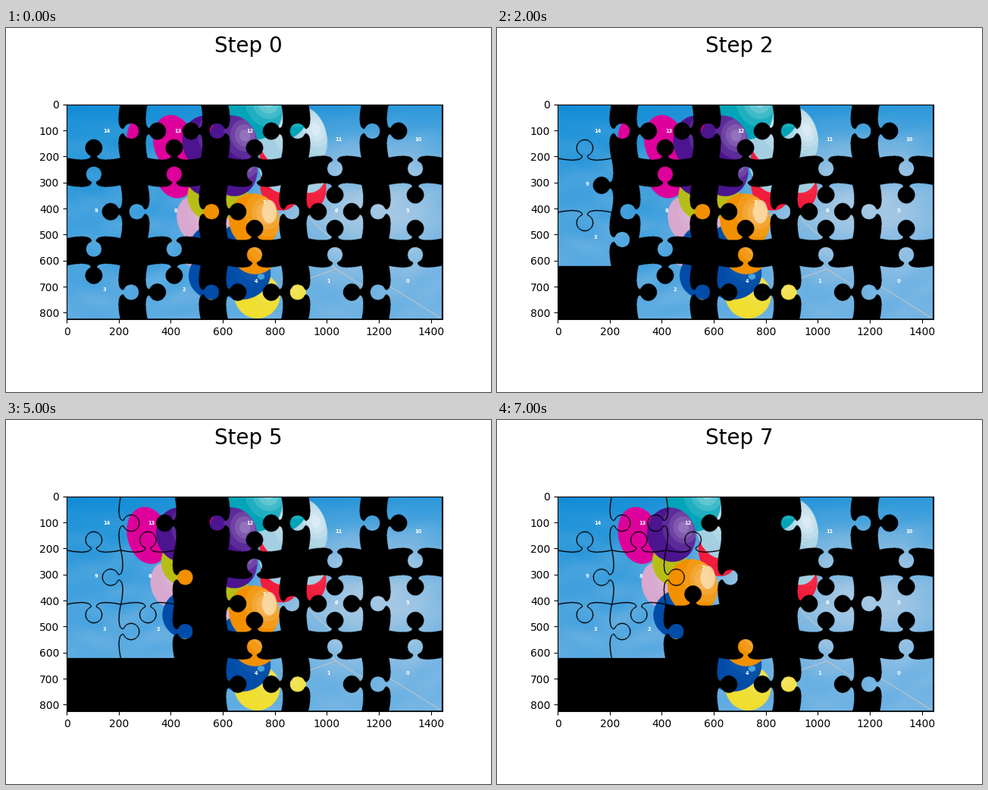
A matplotlib script for the animation above (8 s loop, 640x480 px).

```python
import numpy as np
import matplotlib.pyplot as plt
from matplotlib.animation import FuncAnimation
from matplotlib.colors import to_rgb
from matplotlib.path import Path

COLS, ROWS = 5, 3
CELL, PITCH = 208, 309         # joined and scattered spacing
PW, PH = COLS * CELL, ROWS * CELL
W, H = 1445, 826               # board size
SCALE = 496 / W                # stage pixels per board unit
LEFT, TOP = 80, 101            # board corner on the stage

# which way the knob of each inner edge points
KNOB_X = ["RLLR", "LRRL", "RRLL"]
KNOB_Y = ["UUUDD", "DDUUU"]
SIGN = {"R": 1, "D": 1, "L": -1, "U": -1}
NAMES = [*range(14, 4, -1), 3, 2, 4, 1, 0]

# centre, radii (stage pixels), gloss, colour; from back to front
BALLOONS = [
    (291, 144, 28, 40, .6, "#a4cfe2"),
    (187, 153, 27, 38, .0, "#de009b"),
    (213, 218, 22, 30, .2, "#d8a8cf"),
    (259, 108, 36, 40, .5, "#00a4b8"),
    (262, 284, 30, 30, .2, "#f0de30"),
    (228, 190, 23, 28, .0, "#b6be16"),
    (230, 152, 32, 36, .4, "#4c148e"),
    (243, 256, 37, 33, .1, "#004ca8"),
    (258, 220, 33, 36, .4, "#f29000"),
]
RED = (292, 175, 26, 32, .1, "#f21c3c")
TILT = np.radians(-14)


# ---------- photo, in stage pixels ----------
X, Y = np.meshgrid(LEFT + np.arange(PW) * SCALE, TOP + np.arange(PH) * SCALE)


def blend(img, color, alpha):
    alpha = np.asarray(alpha, float)[..., None]
    img[:] = img * (1 - alpha) + np.array(to_rgb(color)) * alpha


def glow(cx, cy, rx, ry):
    return np.exp(-((X - cx) / rx) ** 2 - ((Y - cy) / ry) ** 2)


def balloon(img, cx, cy, rx, ry, gloss, color):
    dx, dy = X - cx, Y - cy
    u = (dx * np.cos(TILT) + dy * np.sin(TILT)) / rx
    v = (dy * np.cos(TILT) - dx * np.sin(TILT)) / ry
    inside = u ** 2 + v ** 2 < 1
    shade = np.exp(-((u - .55) / .6) ** 2 - ((v + .15) / .6) ** 2)
    blend(img, color, inside)
    blend(img, "white", inside * gloss * np.round(shade * 4) / 4)


def string(img, x0, y0, x1, y1):
    vx, vy = x1 - x0, y1 - y0
    t = np.clip(((X - x0) * vx + (Y - y0) * vy) / (vx ** 2 + vy ** 2), 0, 1)
    dist = np.hypot(X - x0 - t * vx, Y - y0 - t * vy)
    blend(img, "#cbc5c6", (dist < .6) * .85)


def wisps(rng):
    """Soft streaks from a few random waves, between 0 and 1."""
    total = np.zeros_like(X)
    for _ in range(8):
        kx, ky, phase = rng.uniform((-.09, .05, 0), (.09, .2, 6.3))
        total += np.sin(kx * X + ky * Y + phase + 1.5 * np.sin(X / 31))
    return np.clip(.5 + total / 10, 0, 1)


def make_photo():
    img = np.empty((PH, PW, 3))
    img[:] = to_rgb("#0e8cd6")
    blend(img, "#6cb2e5", np.clip(.72 * (Y - 101) / 212
                                  + .28 * (X - 80) / 354, 0, 1))
    blend(img, "#c3d4e6", .75 * glow(365, 205, 95, 58))
    blend(img, "#c3d4e6", .2 * wisps(np.random.default_rng(4))
          * np.clip((Y - 101) / 60, 0, 1))

    knot = 331, 249
    string(img, 291, 212, *knot)
    string(img, 294, 262, *knot)
    string(img, *knot, 434, 313)

    balloon(img, *RED)
    for spec in BALLOONS:
        balloon(img, *spec)
    blend(img, "#fae0b0", .8 * (glow(278, 208, 10, 16) > .4))
    blend(img, "#46a5de", glow(267, 259, 5, 4) > .4)
    return (img.clip(0, 1) * 255).astype(np.uint8)


# ---------- pieces ----------
def bezier(a, b, c, d, n=14):
    t = np.linspace(0, 1, n, endpoint=False)
    return (a * (1 - t) ** 3 + 3 * b * t * (1 - t) ** 2
            + 3 * c * t ** 2 * (1 - t) + d * t ** 3)


def knob_profile():
    """Edge from 0 to 1 with the knob along the positive imaginary axis."""
    center, r = .5 + .19j, .15
    foot, neck = .44 + .012j, .437 + .054j
    start = np.angle(neck - center)
    arc = center + r * np.exp(1j * np.linspace(start, -1.5 * np.pi, 24))
    half = np.concatenate([bezier(0, .15 - .035j, .39 - .06j, foot),
                           bezier(foot, .454 + .03j, .454 + .042j, neck), arc])
    return np.concatenate([half, (1 - half.conj())[::-1][1:-1]])


PROFILE = knob_profile()


def side(p, q, knob):
    if knob == 0:
        return np.array([p])
    return p + (q - p) * (PROFILE.conj() if knob > 0 else PROFILE)


def knob(rows, r, c):
    inner = 0 <= r < len(rows) and 0 <= c < len(rows[0])
    return SIGN[rows[r][c]] if inner else 0


class Piece:
    def __init__(self, r, c, photo):
        self.r, self.c = r, c
        self.turn = c * ROWS + r      # joins column by column
        tl = CELL * (c + 1j * r)
        tr, bl = tl + CELL, tl + CELL * 1j
        br = tr + CELL * 1j
        outline = np.concatenate([side(tl, tr, -knob(KNOB_Y, r - 1, c)),
                                  side(tr, br, knob(KNOB_X, r, c)),
                                  side(br, bl, knob(KNOB_Y, r, c)),
                                  side(bl, tl, -knob(KNOB_X, r, c - 1))])
        corners = np.column_stack([outline.real, outline.imag])
        low, high = corners.min(0), corners.max(0)
        self.middle = (low + high) / 2

        gx, gy = np.meshgrid(np.arange(max(low[0], 0), min(high[0], PW), 1, int),
                             np.arange(max(low[1], 0), min(high[1], PH), 1, int))
        full = Path(corners).contains_points(
            np.column_stack([gx.ravel(), gy.ravel()])).reshape(gx.shape)
        # trim the rim so that a dark seam stays between joined pieces
        full = np.pad(full, 3)
        mask = full.copy()
        for angle in np.arange(8) * np.pi / 4:
            step = round(2 * np.sin(angle)), round(2 * np.cos(angle))
            mask &= np.roll(full, step, (0, 1))
        mask = mask[3:-3, 3:-3]
        self.x, self.y = gx[mask], gy[mask]
        self.colors = photo[self.y, self.x]

    def shift(self, step):
        gap = 0 if self.turn <= step else PITCH - CELL
        return gap * self.c, gap * self.r

    def paste(self, board, step):
        dx, dy = self.shift(step)
        board[self.y + dy, self.x + dx] = self.colors


photo = make_photo()
pieces = [Piece(r, c, photo) for r in range(ROWS) for c in range(COLS)]

fig, ax = plt.subplots(figsize=(6.4, 4.8), dpi=100)
image = ax.imshow(np.zeros((H, W, 3), np.uint8))
title = fig.suptitle("Step 0", fontsize=20)
labels = [ax.text(0, 0, str(name), color="white", fontsize=4.8, weight="bold")
          for name in NAMES]


def update(step):
    board = np.zeros((H, W, 3), np.uint8)
    for piece, label in zip(pieces, labels):
        piece.paste(board, step)
        label.set_position(piece.middle + piece.shift(step))
    image.set_data(board)
    title.set_text(f"Step {step}")
    return [image, title, *labels]


anim = FuncAnimation(fig, update, frames=8, interval=1000, repeat=True)
plt.show()
```
